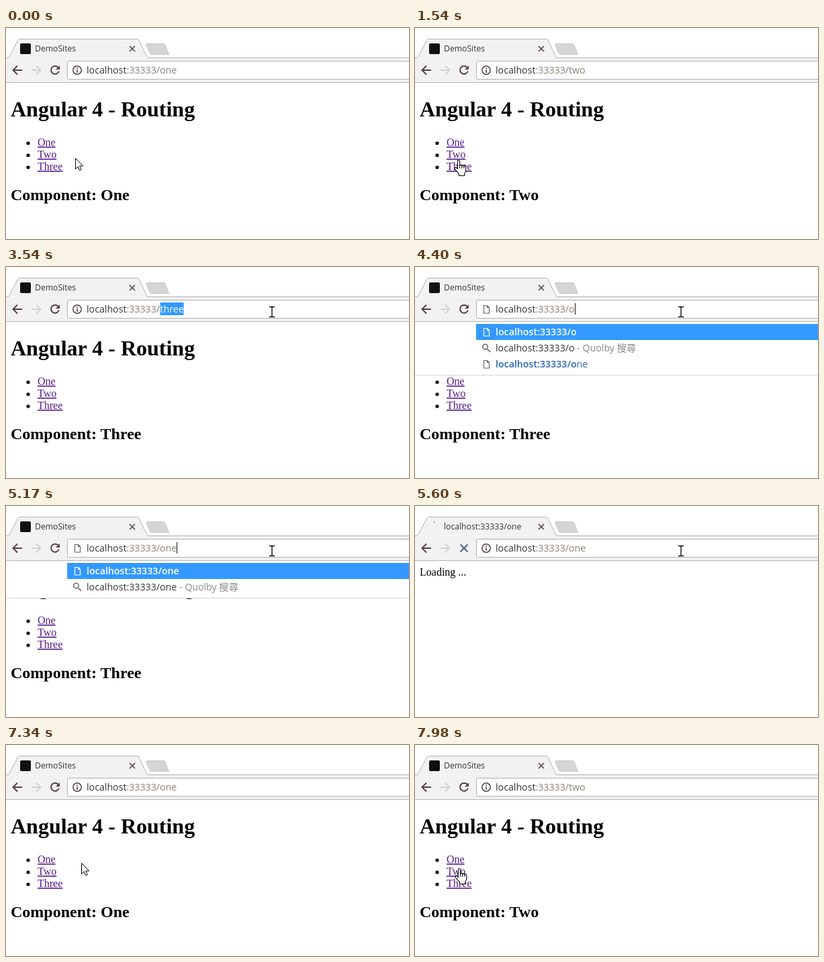
Recreate the animation shown at these times as an HTML page. Size 600 px wide and 315 px high, loop 8 s.

```html
<!DOCTYPE html>
<html lang="en">
<head>
<meta charset="utf-8">
<title>Routing demo</title>
<style>
  html, body { margin: 0; width: 100%; height: 100%; overflow: hidden; background: #fff; }
  svg { display: block; width: 600px; height: 315px; }
  text { white-space: pre; }
  .ui { font: 14.2px "Open Sans", "Noto Sans", "Noto Sans CJK TC", "Noto Sans CJK", sans-serif; fill: #333; }
  .title { font-size: 12.2px; }
  .dim { fill: #8b8178; }
  .strong { font-weight: 600; }
  .page { font: 16px "Liberation Serif", "Times New Roman", serif; fill: #000; }
  .page .h1 { font-size: 32px; font-weight: bold; }
  .page .h2 { font-size: 24px; font-weight: bold; }
  .link { fill: #551a8b; text-decoration: underline; }
  .link.active { fill: #e00; }
  .line { fill: none; stroke: #54404c; stroke-width: 2; }
</style>
</head>
<body>
<svg viewBox="0 0 600 315">
  <defs>
    <path id="doc" d="M.5 .5h5l3 3v8.500h-8zM5.500 .5v3h3" fill="none" stroke-width="1.200"/>
    <path id="arrow" d="M.5 .5V16.500L4.200 13L6.700 18.700L9.200 17.600L6.700 12H11.700Z" fill="#fff" stroke="#000"/>
    <g id="hand" transform="translate(-6.700)" stroke="#000" stroke-width="1.100" stroke-linejoin="round">
      <path fill="#fff" d="M5 13.500V2.200a1.700 1.700 0 0 1 3.400 0V8.500a1.600 1.600 0 0 1 3.100 .4a1.600 1.600 0 0 1 3.100 .6a1.500 1.500 0 0 1 2.800 1V15.500q0 2.800-2 5V23.500H7.200V21Q4.500 18 1 13.600q-.8-1.700 .6-2.400q1.500-.4 3.400 2.300z"/>
      <path fill="none" d="M8.400 8.500V12.500M11.500 9V12.500M14.600 9.600V12.500"/>
    </g>
    <path id="beam" d="M-4 -7.500h3l1 1l1 -1h3M0 -6.500V6.500M-4 7.500h3l1 -1l1 1h3" fill="none" stroke="#000" stroke-width="1.300"/>
    <clipPath id="sel"><rect id="selBox" x="229.500" y="53" width="0" height="19"/></clipPath>
  </defs>

  <rect width="600" height="315" fill="#fff"/>

  <g class="page">
    <g id="content">
      <text class="h1" x="7" y="132">Angular 4 - Routing</text>
      <g><circle cx="33" cy="172" r="2.600"/><circle cx="33" cy="190" r="2.600"/><circle cx="33" cy="208" r="2.600"/></g>
      <text class="link" x="47" y="176">One</text>
      <text class="link" id="linkTwo" x="47" y="194">Two</text>
      <text class="link" id="linkThree" x="47" y="212">Three</text>
      <text class="h2" x="7" y="257">Component: <tspan id="comp">One</tspan></text>
    </g>
    <text id="loading" x="7" y="104">Loading ...</text>
  </g>

  <rect y="45" width="600" height="36" fill="#f2f2f2"/>
  <path d="M0 44.500H4L17.500 18.500Q18.500 16.500 20.500 16.500H195Q197 16.500 198 18.500L210.500 44.500H600" fill="#f2f2f2" stroke="#b2b2b2"/>
  <path d="M0 81.500H600" stroke="#b6b6b6"/>
  <path d="M209.500 23.500H234Q236 23.500 237 25.500L242.500 39.500H217Q215 39.500 214 37.500L208.500 24.500Z" fill="#d5d5d5" stroke="#c6c6c6"/>
  <rect id="favicon" x="21" y="23" width="16" height="16" rx="2" fill="#111"/>
  <path id="tabSpin" fill="none" stroke="#8a8a8a" stroke-width="1.500"/>
  <text class="ui title" id="tabTitle" x="43" y="35"></text>
  <path class="line" style="stroke-width:1.600" d="M184 27l8 8m0 -8l-8 8"/>

  <path class="line" d="M24 63H11.500M17 56.500L10.500 63L17 69.500"/>
  <path class="line" style="stroke:#d2d2d2" d="M38 63H50.500M45 56.500L51.500 63L45 69.500"/>
  <g id="reload">
    <path class="line" d="M77.500 58.700A6 6 0 1 0 78.800 64.500"/>
    <path d="M80 56V62H74Z" fill="#54404c"/>
  </g>
  <path id="stop" class="line" style="stroke:#43618c" d="M67.500 57.500l11 11m0 -11l-11 11"/>

  <rect x="91.500" y="49.500" width="520" height="27" rx="2" fill="#fff" stroke="#b0b0b0"/>
  <g id="info">
    <circle cx="106" cy="63" r="6.200" class="line" style="stroke-width:1.500"/>
    <path class="line" style="stroke-width:1.700" d="M106 59.300v1.700m0 1.200v4.500"/>
  </g>
  <use id="editIcon" href="#doc" x="102" y="57" stroke="#666"/>
  <text class="ui" id="url" x="120" y="68">localhost<tspan class="dim">:33333/<tspan id="route"></tspan></tspan></text>
  <g clip-path="url(#sel)">
    <rect x="229" y="53" width="36" height="19" fill="#39f"/>
    <text class="ui" style="fill:#fff" x="229.500" y="68">three</text>
  </g>
  <path id="caret" stroke="#111"/>

  <g id="drop">
    <rect id="dropBg" y="82" width="600" fill="#fff"/>
    <path id="dropEdge" stroke="#d4d4d4"/>
    <rect x="91" y="85" width="509" height="24" fill="#39f"/>
    <use href="#doc" x="102" y="91" stroke="#fff"/>
    <text class="ui strong" style="fill:#fff" x="120" y="102">localhost:33333/<tspan class="typed"></tspan></text>
    <path class="line" style="stroke:#666;stroke-width:1.600" d="M107.500 122.500L112 127"/>
    <circle class="line" style="stroke:#666;stroke-width:1.500" cx="104.500" cy="119" r="3.800"/>
    <text class="ui" x="120" y="126">localhost:33333/<tspan class="typed"></tspan><tspan fill="#888"> - Quolby 搜尋</tspan></text>
    <g id="history">
      <use href="#doc" x="102" y="139" stroke="#666"/>
      <text class="ui" style="fill:#2a66b8" x="120" y="150"><tspan class="strong">localhost:33333/<tspan class="typed"></tspan></tspan><tspan id="rest"></tspan></text>
    </g>
  </g>

  <g id="cursor">
    <use id="pointer"/>
    <g id="busy" fill="none" stroke-width="4">
      <circle cx="14" cy="0" r="6" stroke="#1c86e0" fill="#fff"/>
      <path id="busyArc" d="M14 -6A6 6 0 0 1 20 0" stroke="#55b4f5"/>
    </g>
  </g>
</svg>

<script>
const LOOP = 8000;
const $ = id => document.getElementById(id);
const show = (id, on) => { $(id).style.display = on ? "" : "none"; };
const within = (t, a, b) => t >= a && t < b;

// Last entry whose start time has been reached
const pick = (t, list) => list.filter(e => t >= e[0]).pop()[1];

const routes = [[0, "one"], [980, "two"], [2200, "three"], [4400, "o"], [4830, "on"], [5170, "one"], [7870, "two"]];
const comps = [[0, "One"], [980, "Two"], [2200, "Three"], [5600, "One"], [7870, "Two"]];

// first step, last step, step count, target x, target y
const moves = [
  [100, 430, 4, 63, 186],
  [1300, 1750, 5, 67, 205],
  [2310, 2860, 6, 230, 72],
  [2980, 3540, 6, 396, 67],
  [6460, 6460, 1, 396, 55],
  [6690, 6690, 1, 335, 77],
  [6800, 7440, 7, 75, 192],
  [7550, 7660, 2, 66, 184]
];

function progress(t, a, b, n) {
  if (t < a) return 0;
  if (t >= b) return 1;
  return (Math.floor((t - a) / (b - a) * (n - 1)) + 1) / n;
}

function cursorAt(t) {
  let x = 103, y = 194;
  for (const [a, b, n, tx, ty] of moves) {
    const p = progress(t, a, b, n);
    x += (tx - x) * p;
    y += (ty - y) * p;
    if (p < 1) break;
  }
  return [x, y];
}

function pointerKind(x, y) {
  if (x > 115 && y > 49 && y < 77) return "beam";
  return x > 46 && x < 76 && y > 163 && y < 217 ? "hand" : "arrow";
}

function drawSpinner(t) {
  const grow = Math.floor((t - 5600) / 110);
  const end = -1.75 - grow * 0.7, start = end + 0.3 + Math.min(grow * 0.5, 3);
  const at = a => (29 + 6.5 * Math.cos(a)).toFixed(2) + " " + (31 + 6.5 * Math.sin(a)).toFixed(2);
  $("tabSpin").setAttribute("d", `M${at(start)}A6.5 6.5 0 ${start - end > Math.PI ? 1 : 0} 0 ${at(end)}`);
}

function render(t) {
  const route = pick(t, routes);
  const loading = within(t, 5600, 6140);
  const editing = within(t, 4400, 5600);
  const open = within(t, 4400, 5280);

  $("route").textContent = route;
  $("comp").textContent = pick(t, comps);
  $("tabTitle").textContent = loading ? "localhost:33333/one" : "DemoSites";
  $("linkTwo").classList.toggle("active", within(t, 860, 980) || within(t, 7770, 7870));
  $("linkThree").classList.toggle("active", within(t, 2090, 2200));

  show("content", !loading);
  show("loading", loading);
  show("favicon", !loading);
  show("tabSpin", loading);
  if (loading) drawSpinner(t);
  const busyLoad = within(t, 5280, 6250);
  show("reload", !busyLoad);
  show("stop", busyLoad);
  show("info", !editing);
  show("editIcon", editing);

  show("drop", open);
  show("caret", open);
  if (open) {
    const full = route === "one", bottom = full ? 137 : 161;
    document.querySelectorAll(".typed").forEach(e => { e.textContent = route; });
    $("rest").textContent = "one".slice(route.length);
    show("history", !full);
    $("dropBg").setAttribute("height", bottom - 82);
    $("dropEdge").setAttribute("d", `M0 ${bottom + 0.5}H600`);
    const cx = Math.round(120 + $("url").getComputedTextLength()) + 0.5;
    $("caret").setAttribute("d", `M${cx} 54V71`);
  }

  const [x, y] = cursorAt(t);
  const dragged = within(t, 2980, 4400) ? Math.min(35, x - 229.5) : 0;
  $("selBox").setAttribute("width", dragged);
  $("pointer").setAttribute("href", "#" + pointerKind(x, y));
  $("cursor").setAttribute("transform", `translate(${Math.round(x)} ${Math.round(y)})`);
  show("busy", within(t, 6690, 7010));
  $("busyArc").setAttribute("transform", `rotate(${Math.floor((t - 6690) / 107) * 80} 14 0)`);
}

const began = performance.now();
function tick() {
  render((performance.now() - began) % LOOP);
  requestAnimationFrame(tick);
}
render(0);
requestAnimationFrame(tick);
</script>
</body>
</html>
```
